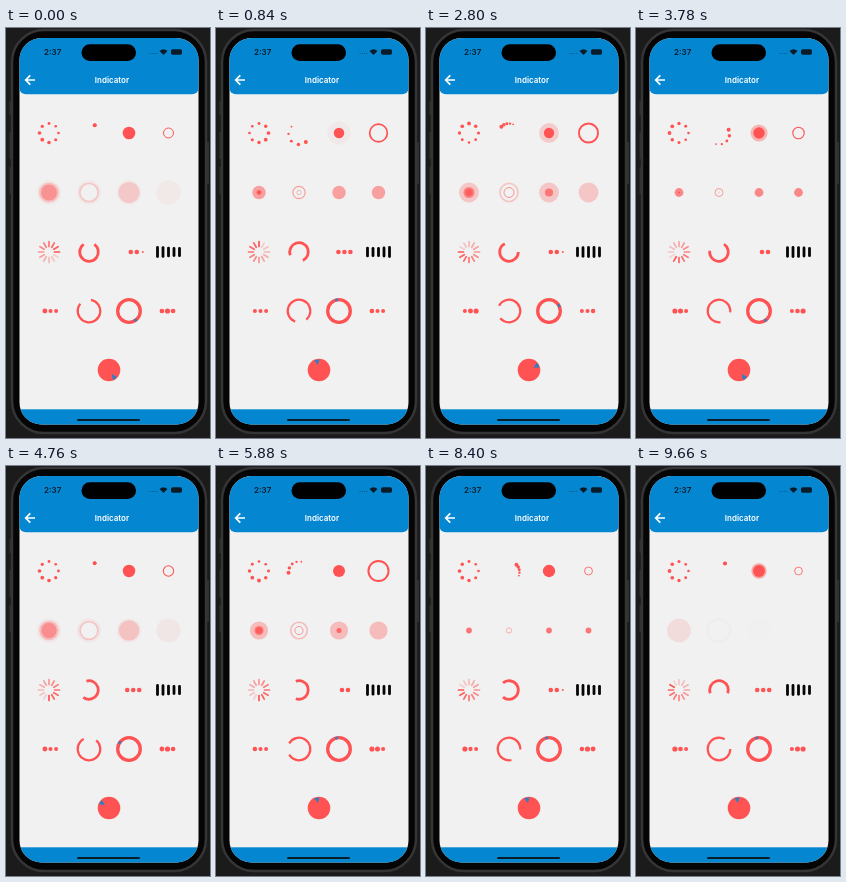
Recreate the animation shown at these times as an HTML page with a canvas. Size 204 by 410 pixels, loop 9800 ms.

```html
<!DOCTYPE html>
<html lang="en">
<head>
<meta charset="utf-8">
<title>Indicator</title>
<style>
html, body { margin: 0; width: 100%; height: 100%; overflow: hidden; background: #1b1b1b; }
svg, canvas { position: absolute; left: 0; top: 0; width: 204px; height: 410px; }
text { font-family: Inter, "Liberation Sans", sans-serif; font-size: 8px; }
</style>
</head>
<body>
<svg viewBox="0 0 204 410">
  <defs><clipPath id="screen"><rect x="13.500" y="10" width="179" height="386.500" rx="22"/></clipPath></defs>
  <path d="M4.500 73v14M4.500 104v27M4.500 139v27M202 114v42" stroke="#303030" stroke-width="2"/>
  <rect x="6" y="2" width="194" height="403" rx="32" fill="#050505" stroke="#353535" stroke-width="2.500"/>
  <g clip-path="url(#screen)">
    <rect x="13" y="10" width="180" height="387" fill="#f1f1f1"/>
    <rect x="13" y="0" width="180" height="66.300" rx="7" fill="#0586d0"/>
    <rect x="13" y="381.300" width="180" height="16" fill="#0586d0"/>
  </g>
  <rect x="75.500" y="16.300" width="54.500" height="16.700" rx="8.300"/>
  <rect x="71" y="391" width="63" height="2" rx="1" fill="#0b1c29"/>
  <text x="38" y="27" font-weight="600" fill="#0a1c2a">2:37</text>
  <text x="106" y="55" font-weight="600" fill="#fff" text-anchor="middle">Indicator</text>
  <path d="M29 52h-9m4.300-4.600L19.700 52l4.600 4.600" fill="none" stroke="#fff" stroke-width="1.700"/>
  <path d="M143.500 25.500h8" stroke="#075c90" stroke-width="1.200" stroke-dasharray="1.200 1"/>
  <path d="M153.500 23q4-3.400 8 0l-4 4z" fill="#0a1c2a"/>
  <rect x="165" y="21.300" width="11" height="5.400" rx="1.700" fill="#0a1c2a"/>
</svg>
<canvas></canvas>
<script>
const RED = '#ff5252', BLUE = '#2b80c4', TAU = Math.PI * 2;
const LOOP = 9800, STEP = 140, WAVE = 1592, BEAT = 1194;
const canvas = document.querySelector('canvas');
const ctx = canvas.getContext('2d');
const ratio = window.devicePixelRatio || 1;
canvas.width = 204 * ratio;
canvas.height = 410 * ratio;
ctx.scale(ratio, ratio);

const frac = v => v - Math.floor(v);
const rad = degrees => (degrees - 90) * Math.PI / 180;

function mix(times, values, t) {
  let i = 1;
  while (i < times.length - 1 && t > times[i]) i++;
  const k = (t - times[i - 1]) / (times[i] - times[i - 1]);
  return values[i - 1] + (values[i] - values[i - 1]) * k;
}

function disc(x, y, r, alpha = 1, color = RED) {
  ctx.globalAlpha = Math.max(0, alpha);
  ctx.fillStyle = color;
  ctx.beginPath();
  ctx.arc(x, y, Math.max(0, r), 0, TAU);
  ctx.fill();
  ctx.globalAlpha = 1;
}

function arc(x, y, r, width, from = 0, to = 360, alpha = 1, color = RED) {
  ctx.globalAlpha = Math.max(0, alpha);
  ctx.strokeStyle = color;
  ctx.lineWidth = width;
  ctx.beginPath();
  ctx.arc(x, y, Math.max(0, r), rad(from), rad(to));
  ctx.stroke();
  ctx.globalAlpha = 1;
}

function balls(x, y, t) {
  for (let i = 0; i < 8; i++) {
    const a = i / 8 * TAU;
    const size = 0.5 + 0.5 * Math.cos(a - t / BEAT * TAU - 4);
    disc(x + 9.5 * Math.sin(a), y - 9.5 * Math.cos(a), 1.3 + 0.6 * size);
  }
}

// Small dots lead the larger ones, evenly spread between the two ends.
function chase(x, y, p) {
  const left = Math.pow((1 - p) / Math.max(p, 0.001), 2.2);
  const lead = 1 / (1 + 0.2 * left), lag = 1 / (1 + 1.7 * left);
  for (let i = 0; i < 5; i++) {
    const a = rad(35 + 360 * (lead + (lag - lead) * i / 4));
    disc(x + 10.5 * Math.cos(a), y + 10.5 * Math.sin(a), 0.9 + 0.27 * i);
  }
}

function pulse(x, y, p) {
  disc(x, y, 5.8 + 7 * Math.pow(Math.max(0, p - 0.04), 0.45), 0.55 * (1 - p) ** 2);
  disc(x, y, 4.8 + 1.5 * Math.pow(Math.abs(2 * p - 1), 1.3));
}

function breathe(x, y, p) {
  const r = 12.2 * (0.29 + 0.62 * Math.cos(Math.PI * (p - 0.6)) ** 2);
  arc(x, y, r * 0.91, r * 0.18);
}

function wave(x, y, q, outline) {
  const r = 12.5 * (q + 0.7 * q * q * (1 - q));
  const alpha = Math.pow(1 - q, 1.1);
  if (outline) arc(x, y, r * 0.91, r * 0.18, 0, 360, alpha);
  else disc(x, y, r, alpha);
}

function waves(y, p) {
  const late = (start, power) => 1 - Math.pow(1 - Math.max(0, p - start) / (1 - start), power);
  for (const x of [43, 83, 123, 162.5]) wave(x, y, p, x === 83);
  wave(43, y, late(0.2, 0.5));
  wave(43, y, late(0.2, 0.32));
  wave(83, y, late(0.2, 0.5), true);
  wave(123, y, late(0.5, 0.7));
}

function spokes(x, y, head) {
  ctx.lineCap = 'round';
  ctx.lineWidth = 1.7;
  ctx.strokeStyle = RED;
  for (let i = 0; i < 12; i++) {
    const a = rad(i * 30), c = Math.cos(a), s = Math.sin(a);
    ctx.globalAlpha = 1 - 0.85 * frac(head - i / 12);
    ctx.beginPath();
    ctx.moveTo(x + 5.5 * c, y + 5.5 * s);
    ctx.lineTo(x + 10.5 * c, y + 10.5 * s);
    ctx.stroke();
  }
  ctx.globalAlpha = 1;
  ctx.lineCap = 'butt';
}

const poses = [0, 1680, 3780, 5880, 7280, 8400, 9660];
function gapRing(x, y, r, width, turns, gaps, t) {
  const middle = mix(poses, turns, t), half = mix(poses, gaps, t) / 2;
  arc(x, y, r, width, middle + half, middle + 360 - half);
}

function pellets(x, y, u) {
  for (let i = 0; i < 3; i++) {
    disc(x + 6 * (i - u), y, i < 2 ? 2.3 : 2.3 * Math.min(1, u * 2));
  }
}

function dots(x, y, p) {
  for (let i = 0; i < 3; i++) {
    const size = Math.max(0, Math.cos((p - 0.1 - 0.15 * i) * TAU));
    disc(x + 5.6 * (i - 1), y, 2 + 0.6 * size);
  }
}

function bars(x, y, p) {
  ctx.fillStyle = '#050505';
  for (let i = 0; i < 5; i++) {
    const h = 11 + Math.cos((p - i * 0.15) * TAU);
    ctx.beginPath();
    ctx.roundRect(x + 5.5 * (i - 2) - 1.4, y - h / 2, 2.8, h, 1.4);
    ctx.fill();
  }
}

function wedge(x, y, angle) {
  disc(x, y, 11.3);
  ctx.fillStyle = BLUE;
  ctx.beginPath();
  ctx.moveTo(x + 5 * Math.cos(rad(angle)), y + 5 * Math.sin(rad(angle)));
  ctx.arc(x, y, 10.6, rad(angle - 14), rad(angle + 14));
  ctx.fill();
}

function draw(t) {
  ctx.clearRect(0, 0, 204, 410);
  const p = frac(t / WAVE + 0.931), beat = frac(t / BEAT);
  balls(43, 105, t);
  chase(83, 106, p);
  pulse(123, 105, beat);
  breathe(162.5, 105, p);

  waves(164.5, p);

  spokes(43, 224, t / 1120 + 0.25);
  gapRing(83, 224, 9.3, 2.8, [0, 405, 1055, 1710, 2138, 2430, 2700],
    [70, 120, 115, 140, 135, 100, 140], t);
  pellets(126, 224, frac(t / 350 + 0.2));
  bars(162.5, 224, beat);

  const spin = mix([0, 1 / 3, 2 / 3, 7 / 9, 1], [145, 20, -12, -55, -215], frac(t / 1260));
  dots(44.500, 283, beat);
  gapRing(83, 283, 11.3, 2.2, [-20, 360, 855, 1350, 1670, 1930, 2220],
    [60, 60, 75, 60, 75, 75, 60], t);
  arc(123, 283, 11.3, 3.3);
  arc(123, 283, 11.3, 2.6, spin - 8, spin + 8, 0.85, BLUE);
  dots(161.500, 283, beat + 0.25);

  wedge(103, 342, spin);
}

const start = performance.now();
function tick() {
  const t = (performance.now() - start) % LOOP;
  draw(Math.floor(t / STEP) * STEP);
  requestAnimationFrame(tick);
}
tick();
</script>
</body>
</html>
```
